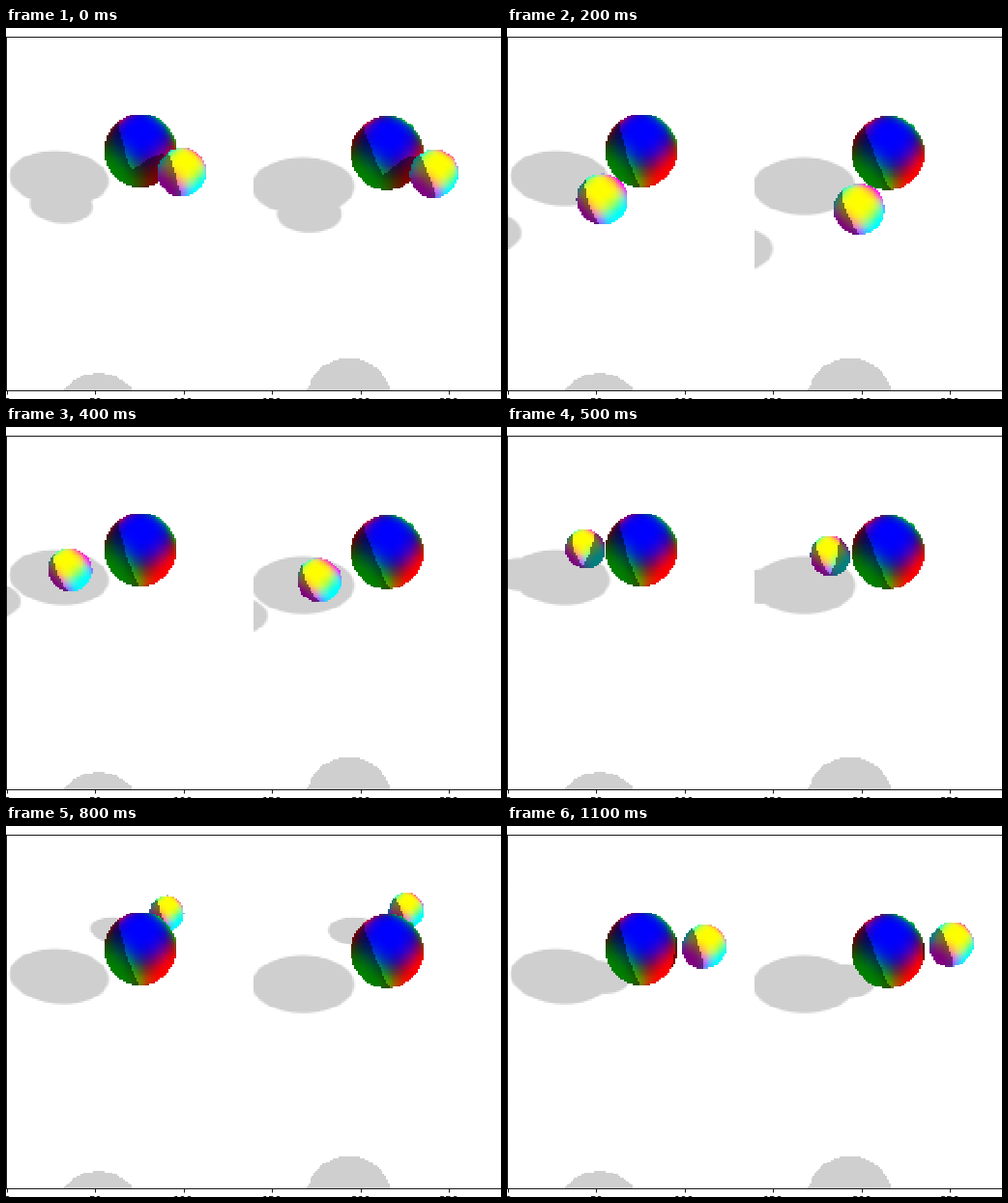
These frames come from a looping animation (512x384 px, 1200 ms). A matplotlib script:

```python
import numpy as np
import matplotlib.pyplot as plt
from matplotlib.animation import FuncAnimation

STEPS = 12
W, H = 140, 200            # size of one stereo half
SCALE = 512 / (2 * W)      # screen pixels per image pixel
FOCAL = 300

# World axes: right, away, up
BIG = np.array([9.3, 28, 62.7])
BIG_R, SMALL_R = 31.9, 18.4
ORBIT_CENTER = np.array([9.3, 30, 62.7])
ORBIT = np.array([[30.5, -41.5, 20], [-52, -52, 11.5]])
SHADOW = np.array([-79, 47.3])
SHADOW_ORBIT = np.array([[6.5, -36.2], [-77, -58]])
SHADOW_SIZE = np.array([55, 38])
SMALL_SHADOW = 0.6
LAMP = np.array([0.72, -0.24, 0.65])
SHADE = np.array([0.943, 0.147, 0.30])
SHADE_EDGE = -0.274
PIVOT = np.array([2, 23, 0])
GREY = 207 / 255

LAMP = LAMP / np.linalg.norm(LAMP)


def color_axes(tilt):
    """Directions that paint red, green and blue."""
    c, s = np.cos(tilt), np.sin(tilt)
    right, back = np.array([1, 0, 0]), np.array([0, c, s])
    return np.array([(right - back) / np.sqrt(2),
                     (right + back) / np.sqrt(2),
                     [0, -s, c]])


AXES = color_axes(np.radians(13))


def turn(v, angle):
    """Rotate about the vertical axis."""
    c, s = np.cos(angle), np.sin(angle)
    x, y, z = np.moveaxis(np.asarray(v, float), -1, 0)
    return np.stack([c * x - s * y, s * x + c * y, z], axis=-1)


class View:
    def __init__(self, angle, pitch, drop, disc):
        cols, rows = np.meshgrid(np.arange(W) + 0.5, np.arange(H) + 0.5)
        x = (cols - W / 2) * SCALE
        y = (H / 2 - rows) * SCALE + drop
        c, s = np.cos(np.radians(pitch)), np.sin(np.radians(pitch))
        rays = np.stack([x, y * s + FOCAL * c, y * c - FOCAL * s], axis=-1)
        rays /= np.linalg.norm(rays, axis=-1, keepdims=True)
        eye = FOCAL * np.array([0, -c, s])
        self.rays = turn(rays, -angle)
        self.eye = turn(eye - PIVOT, -angle) + PIVOT
        reach = -self.eye[2] / self.rays[..., 2]
        self.ground = (self.eye + reach[..., None] * self.rays)[..., :2]
        dx, dy, r = disc
        top = (384 - H * SCALE) / 2
        self.disc = np.hypot(cols * SCALE - dx, rows * SCALE + top - dy) < r

    def shadow(self, center, size):
        d = self.ground - center
        u = (d[..., 0] + 0.26 * d[..., 1]) / (SHADOW_SIZE[0] * size)
        v = d[..., 1] / (SHADOW_SIZE[1] * size)
        return np.clip((1 - np.hypot(u, v)) * size / 0.06 + 0.5, 0, 1)

    def hit(self, center, radius):
        oc = self.eye - center
        b = self.rays @ oc
        disc = b * b - (oc @ oc - radius * radius)
        return np.where(disc > 0, -b - np.sqrt(np.maximum(disc, 0)), np.inf)

    def render(self, theta):
        wave = np.array([np.cos(theta), np.sin(theta)])
        small = ORBIT_CENTER + wave @ ORBIT
        dark = np.maximum(self.shadow(SHADOW, 1),
                          self.shadow(SHADOW + wave @ SHADOW_ORBIT, SMALL_SHADOW))
        img = np.repeat((1 - (1 - GREY) * dark)[..., None], 3, axis=-1)
        img[self.disc] = GREY

        balls = [(BIG, BIG_R), (small, SMALL_R)]
        depth = [self.hit(*ball) for ball in balls]
        for i, (center, radius) in enumerate(balls):
            seen = np.isfinite(depth[i]) & (depth[i] < depth[1 - i])
            point = self.eye + depth[i][seen][:, None] * self.rays[seen]
            normal = (point - center) / radius
            color = ease((normal @ AXES.T) ** 2)
            if i == 1:
                color = 1 - color
            unlit = (normal @ SHADE < SHADE_EDGE) | blocked(point, *balls[1 - i])
            color[unlit] *= 0.5
            img[seen] = color
        return np.clip(img, 0, 1)


def ease(t):
    return t * t * (3 - 2 * t)


def blocked(point, center, radius):
    """True where the other ball stands between a point and the lamp."""
    to = center - point
    along = to @ LAMP
    return (along > 0) & ((to ** 2).sum(axis=1) - along ** 2 < radius ** 2)


VIEWS = [View(0, 60, 0, (95.5, 402, 45)),
         View(0.115, 62.5, 2, (98.5, 386, 44.5))]


def picture(step):
    theta = 2 * np.pi * step / STEPS
    return np.hstack([view.render(theta) for view in VIEWS])


fig, ax = plt.subplots(figsize=(6.4, 4.8), dpi=80)
fig.subplots_adjust(left=0, right=1, bottom=0, top=1)
image = ax.imshow(picture(0), interpolation="nearest")


def update(step):
    image.set_data(picture(step))
    return [image]


anim = FuncAnimation(fig, update, frames=STEPS, interval=100, repeat=True)
plt.show()
```
